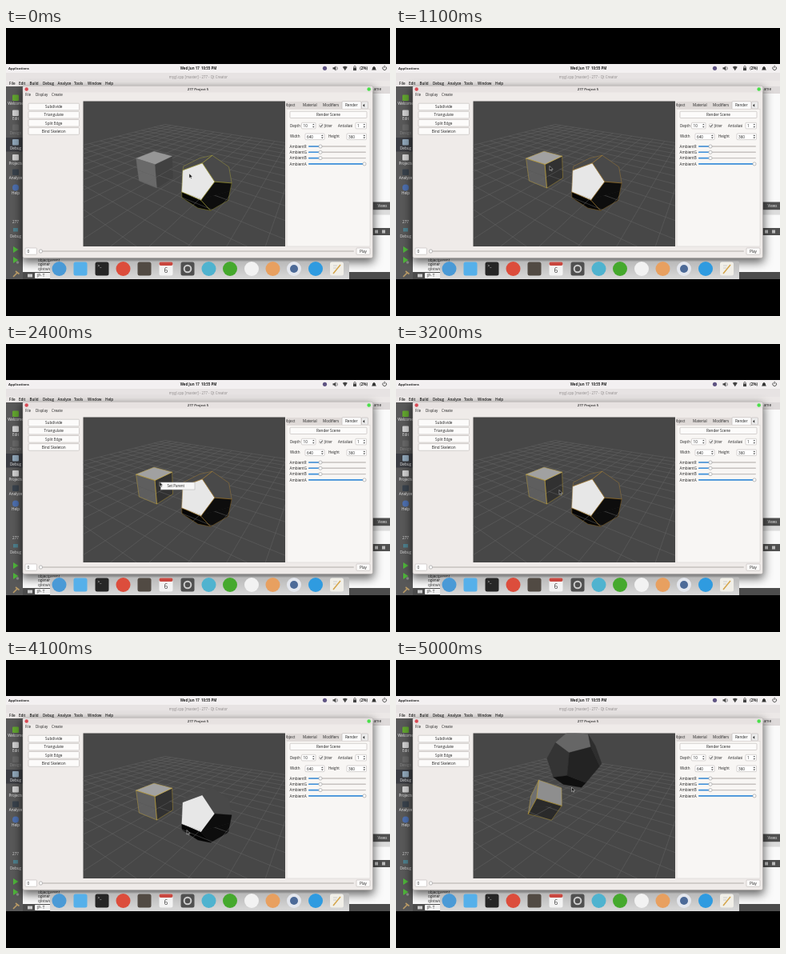
Animation of 480x360 px, one loop 5.1 s. Source, as an HTML page:

```html
<!DOCTYPE html>
<html lang="en">
<head>
<meta charset="utf-8">
<title>Set Parent</title>
<style>
  html, body { margin: 0; width: 100%; height: 100%; overflow: hidden; background: #000; }
  svg { display: block; width: 480px; height: 360px; }
  text { font-family: "Open Sans", "Noto Sans", sans-serif; font-size: 4.7px; fill: #222; }
</style>
</head>
<body>
<svg id="stage" viewBox="0 0 480 360">
  <defs>
    <clipPath id="port"><rect x="96.5" y="91.5" width="252.5" height="181.5"/></clipPath>
    <clipPath id="side"><rect x="0" y="72" width="21" height="242"/></clipPath>
    <clipPath id="tabs"><rect x="350" y="91" width="103" height="11"/></clipPath>
    <clipPath id="screen"><rect x="0" y="45" width="480" height="269"/></clipPath>
    <filter id="blur" x="-10%" y="-10%" width="120%" height="120%"><feGaussianBlur stdDeviation="6"/></filter>
    <linearGradient id="shelf" x2="0" y2="1"><stop stop-color="#b9b9b9"/><stop offset="1" stop-color="#dadada"/></linearGradient>
  </defs>
  <g id="desk" clip-path="url(#screen)"></g>
  <g id="view" clip-path="url(#port)"></g>
  <g id="menu">
    <rect x="193.5" y="173" width="42.5" height="9" fill="#f7f7f7" stroke="#b5b5b5" stroke-width=".6"/>
    <text x="201.5" y="179.2" style="font-size:4.5px">Set Parent</text>
  </g>
  <path id="cursor" d="M0 0V5.6L1.4 4.4L2.3 6.3L3.2 5.9L2.3 4.1H4.1Z" fill="#111" stroke="#ddd" stroke-width=".5"/>
</svg>
<script>
const LOOP = 5100, STEP = 100;
const $ = id => document.getElementById(id);

// ---------- desktop and widgets ----------
const box = (x, y, w, h, fill, more = '') =>
  `<rect x="${x}" y="${y}" width="${w}" height="${h}" fill="${fill}" ${more}/>`;
const dot = (x, y, r, fill, more = '') =>
  `<circle cx="${x}" cy="${y}" r="${r}" fill="${fill}" ${more}/>`;
const line = (d, stroke, w = .6, alpha = 1) =>
  `<path d="${d}" fill="none" stroke="${stroke}" stroke-width="${w}" stroke-opacity="${alpha}"/>`;
const text = (x, y, s, { size = 4.7, fill = '#222', anchor = 'start', weight = 400 } = {}) =>
  `<text x="${x}" y="${y}" text-anchor="${anchor}" style="font-size:${size}px;fill:${fill};font-weight:${weight}">${s}</text>`;
const frame = 'rx="1" stroke="#bcb7b5" stroke-width=".6"';
const button = (x, y, w, h, s) => box(x, y, w, h, '#fcfbfa', frame) +
  text(x + w / 2, y + h / 2 + 1.7, s, { anchor: 'middle' });
const spin = (x, y, w, s) => box(x, y, w, 7.6, '#fff', frame) + text(x + 2, y + 5.5, s) +
  `<path d="M${x + w - 4} ${y + 3}l1.3 -1.6l1.3 1.6zM${x + w - 4} ${y + 4.6}l1.3 1.6l1.3 -1.6z" fill="#444"/>`;
const slider = (x, y, w, at) => box(x, y - .7, w, 1.4, '#c6c2c0', 'rx=".7"') +
  box(x, y - .8, at, 1.6, '#3f92dd', 'rx=".7"') +
  dot(x + at, y, 2.1, '#fafafa', 'stroke="#999" stroke-width=".6"');

function topPanel() {
  const bold = { size: 4.2, weight: 700 };
  const menus = { File: 4, Edit: 16, Build: 29.5, Debug: 46, Analyze: 64.5, Tools: 85, Window: 102, Help: 124 };
  return box(0, 45, 480, 11, '#f3f0f1') + text(3, 52.2, 'Applications', bold) +
    text(240.5, 52.2, 'Wed Jun 17&#160; 10:55 PM', { ...bold, size: 4.4, anchor: 'middle' }) +
    dot(398.5, 50.3, 2.6, '#5f5483') +
    '<path d="M408.5 49.2h1.6l2.2 -1.8v6l-2.2 -1.8h-1.6z" fill="#444"/>' + line('M413.6 48.4q1.4 2 0 4', '#444', .7) +
    '<path d="M420.8 48.8q3 -2.2 6 0l-3 4.4z" fill="#444"/>' +
    box(434, 49.5, 4, 3.6, '#444') + line('M434.8 49.5v-1.4q1.2 -1.6 2.4 0v1.4', '#444', .7) +
    text(442.3, 52.2, '(2%)', { ...bold, size: 4.5 }) +
    '<path d="M457 52.4q1.2 -.8 1.2 -3q1.8 -3 3.6 0q0 2.2 1.2 3z" fill="#333"/>' +
    line('M471.6 48.4a2.4 2.4 0 1 0 3.2 0M473.2 46.8v3', '#444', .9) +
    box(0, 56, 480, 10, '#e7e3e3') +
    text(240.5, 62.9, 'mygl.cpp [master] - 277 - Qt Creator', { size: 4.4, fill: '#8b8787', anchor: 'middle' }) +
    box(0, 66, 480, 7, '#ece8e7') +
    Object.entries(menus).map(([s, x]) => text(x, 71, s, { size: 4.5, weight: 600 })).join('');
}

function sidebar() {
  const modes = [['Welcome', 96, '#62a52f', 1], ['Edit', 115, '#d0d0d0', 1], ['Design', 133, '#666', 0],
    ['Debug', 151.5, '#8fa5b8', 1], ['Projects', 170.5, '#cfcfcf', 1], ['Analyze', 189, '#39424c', 1], ['Help', 207.5, '#4d6fae', 1]];
  let s = box(0, 72, 21.5, 242, '#585858') + box(0, 137, 21.5, 17.5, '#3b3d42');
  for (const [name, y, fill, on] of modes)
    s += (name === 'Help' ? dot(12, y - 8, 4, fill) : box(8, y - 12.5, 8, 7.6, fill, 'rx="1"')) +
      text(12, y, name, { size: 4.6, anchor: 'middle', fill: on ? '#eee' : '#888' });
  s += text(12, 244, '277', { size: 4.6, anchor: 'middle', fill: '#ddd' }) +
    box(9, 250, 6, 4.5, '#4e7f8c') + text(12, 261.5, 'Debug', { size: 4.6, anchor: 'middle', fill: '#ddd' });
  for (const y of [277, 290]) s += `<path d="M9 ${y - 4}l6.5 4l-6.5 4z" fill="#4fb53b"/>`;
  s += dot(14.5, 293, 1.8, '#888') + line('M9 311l5 -5M12 304l4.5 3.5', '#b99a65', 1.6);
  return `<g clip-path="url(#side)">${s}</g>`;
}

function behind() {
  const grey = { size: 4.6 };
  return box(21, 72, 459, 242, '#fafafa') +
    box(456, 73, 24, 9, '#dedada') + text(459.5, 78, 'ame', { size: 4.7 }) +
    box(456, 217.5, 24, 10, '#505050') + text(464.5, 224.3, 'Views', { size: 4.5, fill: '#eee' }) +
    box(456, 227.5, 24, 6, '#dcdcdc') +
    box(456, 250, 24, 9, '#505050') + box(461, 252.5, 4, 4, '#bbb') + box(470, 252.5, 4, 4, '#bbb') +
    text(40, 291.5, 'objectparent', grey) + text(40, 297, 'ogenericatz', grey) + text(40, 302.5, 'qlistwidget', grey) +
    box(21, 305, 459, 9, '#4c4c4c') + box(27, 307.5, 6, 4, '#ccc') +
    box(36, 306, 30, 7, '#f2f2f2', 'rx="1"') + text(39, 311.4, '(P- T', grey);
}

function dock() {
  const tile = (x, fill) => box(x - 8.5, 292.5, 17, 17, fill, 'rx="2.5"');
  const disc = (x, fill) => dot(x, 301, 9, fill);
  return box(55, 291.5, 374, 23, 'url(#shelf)', 'rx="1.5"') +
    disc(66.5, '#4a9ad6') + tile(93, '#55b0ea') +
    tile(120, '#262626') + text(114.5, 299, '&gt;_', { size: 4.6, fill: '#eee' }) +
    disc(146.5, '#dc4d3c') + tile(173, '#514a43') +
    tile(200, '#f3f3f3') + box(191.5, 292.5, 17, 4.5, '#c9473f', 'rx="2"') +
    text(200, 305.8, '6', { size: 8.5, anchor: 'middle', fill: '#444' }) +
    tile(227, '#505050') + dot(227, 301, 4.3, 'none', 'stroke="#ccc" stroke-width="2"') +
    disc(253.5, '#4fb3cf') + disc(280, '#45a92d') + disc(307, '#f2f2f2') +
    disc(333.5, '#e8a060') + disc(360, '#e4e7ee') + dot(360, 301, 5, '#4c6a98') +
    disc(387, '#2f9be0') + tile(413.5, '#f1efe8') + line('M409 307l9 -11', '#d4a54a', 1.5) +
    line('M409 297h5M409 300h4', '#bbb');
}

function appWindow() {
  let s = box(19, 75, 441, 218, '#000', 'rx="4" fill-opacity=".6" filter="url(#blur)"') +
    box(21, 72.5, 437.5, 215, '#efebe9', 'rx="2" stroke="#a5a09e" stroke-width=".5"') +
    box(21.3, 72.8, 437, 7.7, '#e7e2e1', 'rx="2"') +
    dot(25.7, 76.5, 2.2, '#d94a55') + dot(453.7, 76.5, 2.3, '#4be04b') +
    text(240, 78.1, '277 Project 5', { size: 4.3, weight: 600, anchor: 'middle' }) +
    text(24, 85.2, 'File', { size: 4.5 }) + text(37, 85.2, 'Display', { size: 4.5 }) + text(57, 85.2, 'Create', { size: 4.5 });
  ['Subdivide', 'Triangulate', 'Split Edge', 'Bind Skeleton'].forEach((n, i) => s += button(28, 94.2 + i * 10.15, 63.5, 8.6, n));

  let tabs = box(350, 92, 97, 9.2, '#dfdad8') + box(420, 91.7, 24, 10, '#fafafa', frame);
  for (const [n, x] of [['Object', 347.5], ['Material', 371], ['Modifiers', 396], ['Render', 424]]) tabs += text(x, 98.3, n, { size: 4.6 });
  tabs += box(444.5, 92, 8, 9, '#ececec', frame) + '<path d="M448.2 94.8v4l-2.2 -2z" fill="#333"/>';
  s += `<g clip-path="url(#tabs)">${tabs}</g>` + box(351, 101.5, 104, 171.5, '#f8f6f4', 'stroke="#d3cecc" stroke-width=".5"') +
    button(355, 104.3, 96, 8.2, 'Render Scene') +
    text(355, 123.8, 'Depth', { size: 4.5 }) + spin(369.5, 118.3, 17.5, '10') +
    box(391.5, 119.8, 4.6, 4.6, '#fff', frame) + line('M392.4 122.2l1.2 1.3l2 -2.8', '#222', .9) +
    text(398, 123.8, 'Jitter', { size: 4.5 }) + text(415, 123.8, 'Antialiasi', { size: 4.4 }) + spin(437, 118.3, 13.5, '1') +
    text(355, 137.4, 'Width', { size: 4.5 }) + spin(374, 132, 24, '640') +
    text(403, 137.4, 'Height', { size: 4.5 }) + spin(426, 132, 24.5, '360');
  [...'RGBA'].forEach((c, i) => {
    const y = 148 + i * 7.3;
    s += text(354.5, y + 1.6, 'Ambient' + c, { size: 4.6 }) + slider(378, y, 72, c === 'A' ? 70 : 15);
  });
  return s + box(24, 275, 14.5, 8.2, '#fff', frame) + text(26.5, 280.8, '0') +
    slider(42, 279, 393, 1.5) + button(438, 275, 17, 8.2, 'Play');
}

$('desk').innerHTML = behind() + sidebar() + topPanel() + appWindow() + dock();

// ---------- 3D scene, camera space: x right, y up, z to the viewer ----------
const dotp = (a, b) => a[0] * b[0] + a[1] * b[1] + a[2] * b[2];
const add = (a, b, k = 1) => a.map((v, i) => v + b[i] * k);
const mul = (a, k) => a.map(v => v * k);
const cross = (a, b) => [a[1] * b[2] - a[2] * b[1], a[2] * b[0] - a[0] * b[2], a[0] * b[1] - a[1] * b[0]];
const unit = a => mul(a, 1 / Math.hypot(...a));

const EYE = [0, 0, 10], FOCAL = 218;
const PITCH = 27 * Math.PI / 180, YAW = 35 * Math.PI / 180;
const UP = [0, Math.cos(PITCH), Math.sin(PITCH)];
const NEAR = [0, -Math.sin(PITCH), Math.cos(PITCH)];
const U = add([Math.cos(YAW), 0, 0], NEAR, Math.sin(YAW));
const V = add([Math.sin(YAW), 0, 0], NEAR, -Math.cos(YAW));
const AXIS = unit([-.92, -.383, .095]), TURN = 72 * Math.PI / 180;
const LIGHT = unit([-.1, .75, .65]), GLOSS = unit([-.4, .2, .9]);

const project = p => {
  const k = FOCAL / (EYE[2] - p[2]);
  return (222.5 + p[0] * k).toFixed(2) + ' ' + (182 - p[1] * k).toFixed(2);
};
const outline = pts => 'M' + pts.map(project).join('L') + 'Z';

function rotate(p, angle) {
  const c = Math.cos(angle), s = Math.sin(angle);
  return add(add(mul(p, c), cross(AXIS, p), s), AXIS, dotp(AXIS, p) * (1 - c));
}

// Faces of a regular solid from its face normals; three neighbouring planes meet in a corner.
function solid(normals, inner) {
  return normals.map(m => {
    const near = normals.filter(q => dotp(m, q) > -.1 && dotp(m, q) < .9);
    const e = add(near[0], m, -dotp(near[0], m)), f = cross(m, e);
    const turn = q => Math.atan2(dotp(q, f), dotp(q, e));
    near.sort((a, b) => turn(a) - turn(b));
    const pts = near.map((q, i) => {
      const v = add(add(m, q), near[(i + 1) % near.length]);
      return mul(v, inner / dotp(v, m));
    });
    return { m, pts };
  });
}

const withBacks = list => list.concat(list.map(n => mul(n, -1)));
const cube = { pos: [-1.74, .3, -.58], pull: [0, 0, 0], faces: solid(withBacks([U, V, UP]), .74) };

const N = unit([-.455, .1, .885]), T = unit([.885, 0, .455]), B = cross(N, T);
const ring = [0, 1, 2, 3, 4].map(i => {
  const a = (36 + 72 * i) * Math.PI / 180;
  return unit(add(add(mul(N, .5), T, Math.cos(a)), B, Math.sin(a)));
});
const dodeca = { pos: [1.08, -.47, .97], pull: [.05, .1, -.6], faces: solid(withBacks([N, ...ring]), 1.155) };

// Part of a polygon above (side 1) or below (side -1) the floor.
function cut(pts, side) {
  const out = [];
  pts.forEach((p, i) => {
    const q = pts[(i + 1) % pts.length], a = dotp(p, UP) * side, b = dotp(q, UP) * side;
    if (a >= 0) out.push(p);
    if (a * b < 0) out.push(add(p, add(q, p, -1), a / (a - b)));
  });
  return out;
}

const grid = (() => {
  const near = 9;
  const seg = (a, b) => {
    if (a[2] > near && b[2] > near) return '';
    if (a[2] > b[2]) [a, b] = [b, a];
    if (b[2] > near) b = add(a, add(b, a, -1), (near - a[2]) / (b[2] - a[2]));
    return 'M' + project(a) + 'L' + project(b);
  };
  let d = '';
  for (let i = -10; i <= 10; i++)
    for (const [p, q] of [[U, V], [V, U]])
      d += seg(add(mul(p, i), q, -10), add(mul(p, i), q, 10));
  return line(d, '#656565', .5);
})();

// Visible faces at a share k of the turn, lit from above with a gloss on the left.
function visible(obj, k, base, gain) {
  const angle = k * TURN, list = [];
  for (const { m, pts } of obj.faces) {
    const n = rotate(m, angle);
    const at = pts.map(p => add(add(cube.pos, rotate(add(add(obj.pos, p), cube.pos, -1), angle)), obj.pull, k));
    if (dotp(n, add(EYE, at[0], -1)) <= 0) continue;
    const gloss = 180 * (1 - .8 * k) * Math.max(0, dotp(n, GLOSS)) ** 10;
    const v = Math.round(Math.min(245, base + gain * Math.max(0, dotp(n, LIGHT)) + gloss));
    list.push({ at, fill: `rgb(${v},${v},${v})` });
  }
  return list;
}

function scene(k, cubeLine, dodecaLine) {
  const parts = [
    [cubeLine ? visible(cube, k, 42, 122) : visible(cube, k, 60, 92), cubeLine],
    [visible(dodeca, k, 5 + 10 * k, 82), dodecaLine]
  ];
  const half = (faces, side) => faces.map(f => {
    const pts = cut(f.at, side);
    return pts.length > 2 ? `<path d="${outline(pts)}" fill="${f.fill}" stroke="${f.fill}" stroke-width=".3"/>` : '';
  }).join('');
  return box(96, 91, 254, 183, '#474747') +
    parts.map(([f]) => half(f, -1)).join('') + grid +
    parts.map(([f, stroke]) => half(f, 1) + (stroke ? line(f.map(q => outline(q.at)).join(''), stroke, .5, .75) : '')).join('');
}

// ---------- timeline ----------
const path = [[0, 229, 182], [200, 229, 182], [900, 192, 172.5], [2500, 192, 172.5], [2800, 209, 177],
  [3000, 209, 177], [3200, 204, 182.5], [3400, 204, 182.5], [4000, 226, 212.5], [4300, 226, 212.5], [5000, 219.5, 159]];

function pointer(t) {
  const i = Math.max(1, path.findIndex(k => k[0] >= t));
  const [a, b] = [path[i - 1], path[i]], f = (t - a[0]) / (b[0] - a[0]);
  return [1, 2].map(j => a[j] + (b[j] - a[j]) * f);
}

function draw(t) {
  const turned = Math.min(1, Math.max(0, (t - 4300) / 700));
  const cubeLine = t < 1000 ? '' : '#d6b134';
  const dodecaLine = t < 1000 ? '#bdb53c' : t < 3700 ? '#bd8b35' : '';
  $('view').innerHTML = scene(turned, cubeLine, dodecaLine);
  $('menu').style.display = t >= 2300 && t < 3000 ? '' : 'none';
  $('cursor').setAttribute('transform', `translate(${pointer(t)})`);
}

const start = performance.now();
let last = -1;
function tick() {
  const t = Math.floor((performance.now() - start) % LOOP / STEP) * STEP;
  if (t !== last) draw(last = t);
  requestAnimationFrame(tick);
}
tick();
</script>
</body>
</html>
```
